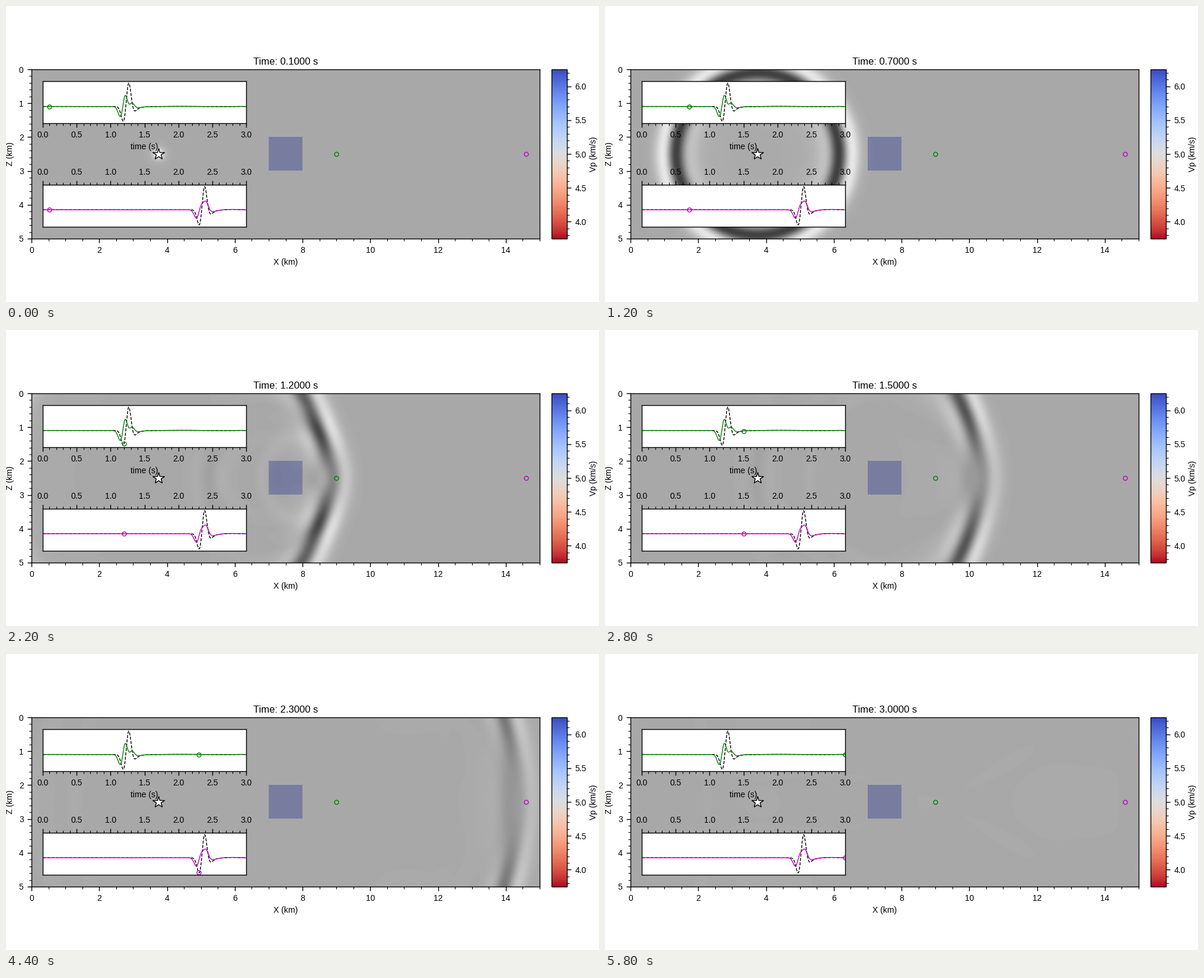
A matplotlib script that plays this animation: 1000 by 500 pixels, repeating every 6 s.

```python
import numpy as np
import matplotlib.pyplot as plt
from matplotlib.animation import FuncAnimation
from matplotlib.cm import ScalarMappable
from matplotlib.colors import Normalize
from matplotlib.ticker import AutoMinorLocator, MultipleLocator

W, H, DPI = 1000, 500, 100
FRAMES, INTERVAL = 30, 200

# Model: 15 x 5 km, 5 km/s with one faster square
DX, DT, PAD = 0.05, 0.004, 80
NX, NZ, STEPS = 301, 101, 750
SNAP = STEPS // FRAMES
SOURCE = (3.75, 2.5)
NEAR, FAR = (9.0, 2.5), (14.6, 2.5)
VP, VP_BLOCK = 5.0, 6.25

plt.rcParams.update({
    "font.family": "Liberation Sans",
    "font.size": 10,
    "axes.linewidth": 1.0,
    "axes.titlesize": 12,
})


def node(point):
    x, z = point
    return PAD + round(z / DX), PAD + round(x / DX)


def ricker(t, freq=5.0, delay=0.2):
    a = (np.pi * freq * (t - delay)) ** 2
    return (1 - 2 * a) * np.exp(-a)


def sponge(n):
    i = np.arange(n)
    depth = np.maximum(0, PAD - np.minimum(i, n - 1 - i)) / PAD
    return np.exp(-0.05 * depth ** 3)


def simulate(block):
    """Acoustic wave equation, fourth order in space; snapshots and traces."""
    shape = NZ + 2 * PAD, NX + 2 * PAD
    vp = np.full(shape, VP)
    if block:
        vp[PAD + 40:PAD + 61, PAD + 140:PAD + 160] = VP_BLOCK
    k = (vp * DT / DX)[2:-2, 2:-2] ** 2
    damp = np.outer(sponge(shape[0]), sponge(shape[1]))
    u, old = np.zeros(shape), np.zeros(shape)
    traces, snaps = np.zeros((2, STEPS + 1)), []
    src, near, far = node(SOURCE), node(NEAR), node(FAR)
    for n in range(1, STEPS + 1):
        mid = u[2:-2, 2:-2]
        side = u[1:-3, 2:-2] + u[3:-1, 2:-2] + u[2:-2, 1:-3] + u[2:-2, 3:-1]
        wide = u[:-4, 2:-2] + u[4:, 2:-2] + u[2:-2, :-4] + u[2:-2, 4:]
        new = np.zeros(shape)
        new[2:-2, 2:-2] = (2 * mid - old[2:-2, 2:-2]
                           + k * (4 / 3 * side - wide / 12 - 5 * mid))
        new[src] += ricker((n - 1) * DT)
        old, u = u * damp, new * damp
        traces[:, n] = u[near], u[far]
        if n % SNAP == 0:
            snaps.append(u[PAD:-PAD, PAD:-PAD].copy())
    return traces, snaps


plain, _ = simulate(False)
traces, snaps = simulate(True)
peak = plain[0].max()
times = np.arange(STEPS + 1) * DT

fig = plt.figure(figsize=(W / DPI, H / DPI), dpi=DPI, facecolor="white")


def axes_at(left, top, right, bottom):
    return fig.add_axes([left / W, 1 - bottom / H,
                         (right - left) / W, (bottom - top) / H])


def style_ticks(ax, pad=4.6):
    ax.tick_params(which="major", length=5, width=1, pad=pad)
    ax.tick_params(which="minor", length=3, width=0.8)


def ring(ax, x, y, color):
    return ax.plot([x], [y], "o", ms=5, mfc="none", mec=color, mew=1)[0]


# Wave field under a translucent velocity map
main = axes_at(43, 107, 900, 393)
scale = 2.5 * peak
half = DX / 2
field = main.imshow(snaps[0], cmap="gray_r", vmin=-0.42 * scale, vmax=0.58 * scale,
                    extent=(-half, 15 + half, 5 + half, -half),
                    interpolation="bilinear", aspect="auto")
cells = np.full((5, 15), VP)
cells[2, 7] = VP_BLOCK
norm = Normalize(3.75, 6.25)
main.imshow(cells, cmap="coolwarm_r", norm=norm, alpha=0.3, extent=(0, 15, 5, 0),
            interpolation="nearest", aspect="auto")
main.plot(*SOURCE, "*", ms=15, mfc="white", mec="black", mew=1)
ring(main, *NEAR, "g")
ring(main, *FAR, "m")
main.set(xlim=(0, 15), ylim=(5, 0), xlabel="X (km)")
main.set_ylabel("Z (km)", labelpad=5.5)
main.xaxis.set_major_locator(MultipleLocator(2))
main.yaxis.set_major_locator(MultipleLocator(1))
main.xaxis.set_minor_locator(AutoMinorLocator())
main.yaxis.set_minor_locator(AutoMinorLocator())
style_ticks(main)
title = main.set_title("")

bar_ax = axes_at(920, 107, 946, 393)
bar = fig.colorbar(ScalarMappable(norm, "coolwarm_r"), cax=bar_ax, label="Vp (km/s)")
bar.set_ticks(np.arange(4, 6.1, 0.5))
bar.ax.yaxis.set_minor_locator(AutoMinorLocator())
style_ticks(bar.ax)


def seismogram(box, row, color, pad=4.6):
    ax = axes_at(*box)
    ax.plot(times, plain[row], "k--", lw=1)
    ax.plot(times, traces[row], color=color, lw=1)
    ax.set_xlim(0, 3)
    ax.set_yticks([])
    ax.xaxis.set_major_locator(MultipleLocator(0.5))
    ax.xaxis.set_minor_locator(AutoMinorLocator())
    style_ticks(ax, pad)
    return ax, ring(ax, 0, 0, color)


upper, near_dot = seismogram((62, 127, 405, 198), 0, "g")
upper.set_xlabel("time (s)")
lower, far_dot = seismogram((62, 302, 405, 373), 1, "m", pad=5.2)
lower.xaxis.tick_top()


def draw(i):
    n = (i + 1) * SNAP
    field.set_data(snaps[i])
    title.set_text(f"Time: {times[n]:.4f} s")
    near_dot.set_data([times[n]], [plain[0, n]])
    far_dot.set_data([times[n]], [plain[1, n]])
    return field, title, near_dot, far_dot


anim = FuncAnimation(fig, draw, frames=FRAMES, init_func=lambda: draw(0),
                     interval=INTERVAL, repeat=True, repeat_delay=0, blit=False)
plt.show()
```
